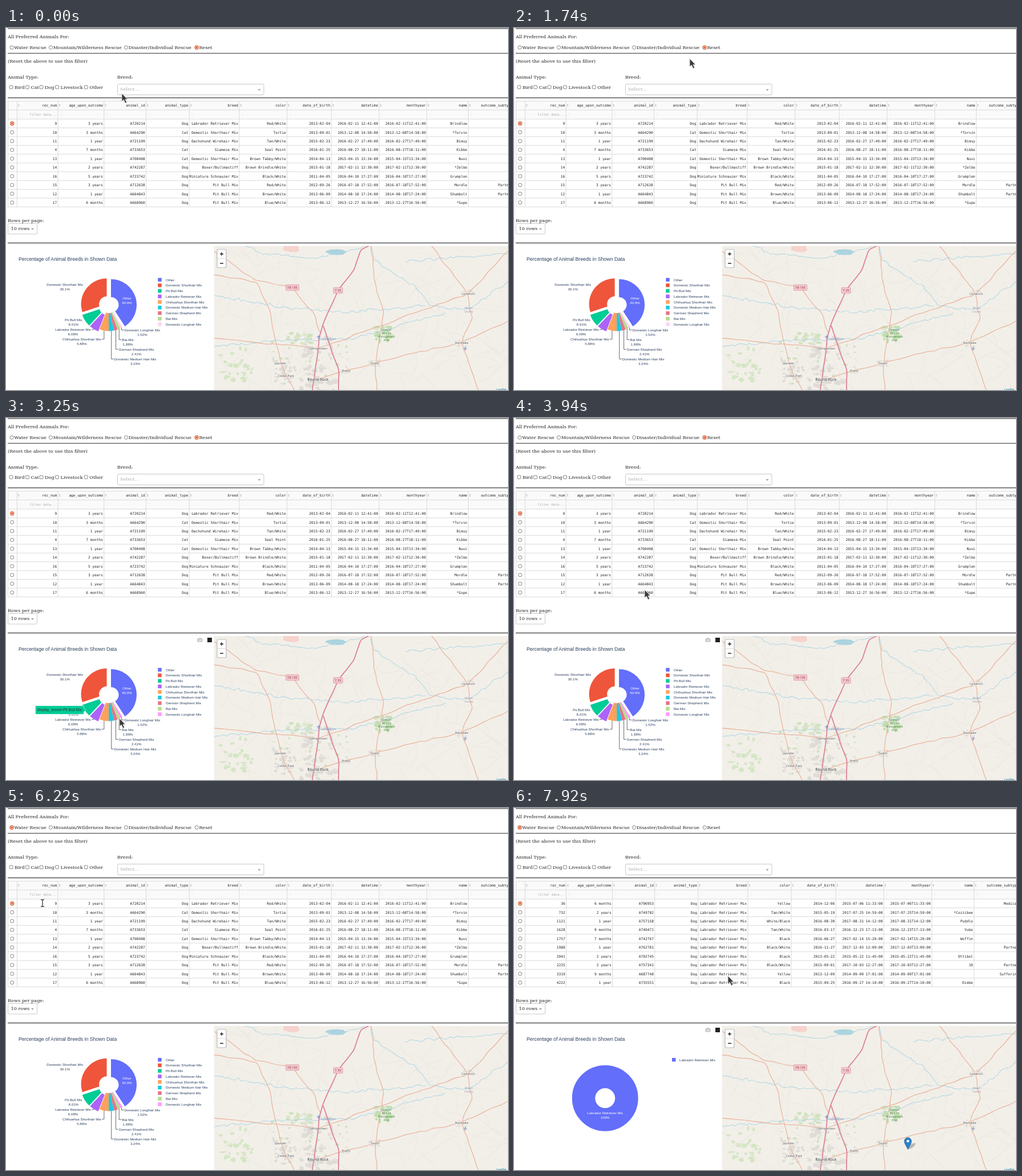
These frames come from a looping animation (880x636 px, 7.99 s). An HTML page:

```html
<!DOCTYPE html>
<html lang="en">
<head>
<meta charset="utf-8">
<title>Animal dashboard</title>
<style>
html, body { margin: 0; width: 100%; height: 100%; overflow: hidden; background: #fff; }
svg { display: block; width: 880px; height: 636px; }
text { white-space: pre; }
.serif { font: 8.12px "DejaVu Serif", "Noto Serif", serif; fill: #222; }
.mono { font: 6.2px "DejaVu Sans Mono", monospace; fill: #222; }
.chart { font: 6.18px "Liberation Sans", Arial, sans-serif; fill: #2a3f5f; }
.map { font: 5.5px "Noto Sans", sans-serif; fill: #555; text-anchor: middle; }
</style>
</head>
<body>
<svg id="stage" viewBox="0 0 880 636" xmlns="http://www.w3.org/2000/svg"></svg>
<script>
const LOOP = 7990, SELECT_AT = 5490, FILTER_AT = 6400;

let seed = 11;
const random = () => (seed = (seed * 16807) % 2147483647) / 2147483647;
const spread = size => (random() - .5) * size;
const range = n => [...Array(n).keys()];
const repeat = (n, draw) => range(n).map(draw).join("");

// Markup helpers
const text = (x, y, s, cls, extra = "") => `<text x="${x}" y="${y}" class="${cls}" ${extra}>${s}</text>`;
const rect = (x, y, w, h, fill, extra = "") =>
  `<rect x="${x}" y="${y}" width="${w}" height="${h}" fill="${fill}" ${extra}/>`;
const circle = (x, y, r, fill, extra = "") => `<circle cx="${x}" cy="${y}" r="${r}" fill="${fill}" ${extra}/>`;
const path = (d, stroke, width = 1, fill = "none") =>
  `<path d="${d}" stroke="${stroke}" stroke-width="${width}" fill="${fill}"/>`;
const group = (id, body, extra = "") => `<g id="${id}" ${extra}>${body}</g>`;
const END = 'text-anchor="end"', MIDDLE = 'text-anchor="middle"';

const pen = document.createElement("canvas").getContext("2d");
const chartWidth = (s, size) => {
  pen.font = `100px "Liberation Sans", Arial, sans-serif`;
  return pen.measureText(s).width * size / 100;
};

const radio = (x, y, on) => on
  ? circle(x, y, 3.1, "#fff", 'stroke="#d9582b" stroke-width="1.2"') + circle(x, y, 1.8, "#d9582b")
  : circle(x, y, 3.1, "#fff", 'stroke="#777" stroke-width=".9"');

// Page controls
const RESCUES = { "Water Rescue": 10, "Mountain/Wilderness Rescue": 78.5, "Disaster/Individual Rescue": 210.5, "Reset": 334.2 };
const TYPES = { Bird: 9, Cat: 37.5, Dog: 62, Livestock: 89.5, Other: 140.3 };

const rescueRadios = chosen =>
  Object.entries(RESCUES).map(([name, x]) => radio(x, 34.2, name === chosen)).join("");

function controls() {
  const rule = y => path(`M3 ${y}H880`, "#6b6b6b", 1.7);
  const caret = (x, y) => path(`M${x - 2.5} ${y - 1}h5l-2.5 2.7z`, "none", 0, "#999");
  const frame = 'rx="2" stroke="#c8c8c8"';
  return rule(1) + rule(44.5) + rule(122.7) + rule(377.6) + path("M.5 0V378", "#eee")
    + text(3, 18, "All Preferred Animals For:", "serif")
    + Object.entries(RESCUES).map(([s, x]) => text(x + 4.3, 37, s, "serif")).join("")
    + text(3, 61, "(Reset the above to use this filter)", "serif")
    + text(3, 88.5, "Animal Type:", "serif") + text(195, 88.5, "Breed:", "serif")
    + Object.entries(TYPES).map(([s, x]) =>
      rect(x - 2.9, 101, 5.8, 5.8, "#fff", 'rx="1" stroke="#777" stroke-width=".9"')
      + text(x + 6, 106.6, s, "serif")).join("")
    + rect(195.5, 98.5, 256.5, 19, "#fff", frame) + caret(444, 108.5)
    + text(200, 110.3, "Select...", "serif", 'style="fill:#aaa"')
    + text(3, 341.2, "Rows per page:", "serif")
    + rect(3.5, 343.5, 51, 18.5, "#fff", frame) + caret(46.5, 353)
    + text(8.5, 355.2, "10 rows", "serif");
}

// Data table
const HEADERS = ["rec_num", "age_upon_outcome", "animal_id", "animal_type", "breed", "color",
  "date_of_birth", "datetime", "monthyear", "name", "outcome_subtype"];

// Row: number | age | id | type | breed | color | birth | date | time | name | subtype
const ALL_ROWS = `9|3 years|A720214|Dog|Labrador Retriever Mix|Red/White|2013-02-04|2016-02-11|12:41:00|Brindlow|
10|3 months|A664290|Cat|Domestic Shorthair Mix|Tortie|2013-09-01|2013-12-08|14:58:00|*Torvin|
11|1 year|A721199|Dog|Dachshund Wirehair Mix|Tan/White|2015-02-23|2016-02-27|17:49:00|Bimsy|
4|7 months|A733653|Cat|Siamese Mix|Seal Point|2016-01-25|2016-08-27|18:11:00|Kibbo|
13|1 year|A700408|Cat|Domestic Shorthair Mix|Brown Tabby/White|2014-04-13|2015-04-15|13:34:00|Nuvi|
14|2 years|A742287|Dog|Boxer/Bullmastiff|Brown Brindle/White|2015-01-18|2017-02-11|12:30:00|*Zelbo|
16|5 years|A723742|Dog|Miniature Schnauzer Mix|Black/White|2011-04-05|2016-04-10|17:27:00|Grumplen|
15|3 years|A712638|Dog|Pit Bull Mix|Red/White|2012-09-26|2016-07-18|17:52:00|Mordle|Partner
12|1 year|A664843|Dog|Pit Bull Mix|Brown/White|2013-06-09|2014-08-18|17:24:00|Shumbolt|Partner
17|6 months|A668960|Dog|Pit Bull Mix|Blue/White|2013-06-12|2013-12-27|16:56:00|*Gupo|`;

const WATER_ROWS = `36|6 months|A706953|Yellow|2014-12-06|2015-07-06|11:33:00||Medical
732|2 years|A749782|Tan/White|2015-05-19|2017-07-25|14:59:00|*Cozzibee|
1121|1 year|A757158|White/Black|2016-08-30|2017-08-31|14:12:00|Puddlo|
1628|9 months|A740471|Tan/White|2016-03-17|2016-12-23|17:13:00|Vubo|
1757|7 months|A742767|Black|2016-06-27|2017-02-14|15:20:00|Woffin|
1988|1 year|A762781|Black/White|2016-11-27|2017-12-03|13:09:00||Partner
2041|2 years|A702745|Black|2013-05-22|2015-05-22|11:45:00|Ottibel|
2225|2 years|A757341|Black/White|2015-09-01|2017-10-03|12:27:00|19|Partner
3319|9 months|A687748|Yellow|2013-12-09|2014-09-09|17:01:00||Suffering
4222|1 year|A735551|Black|2015-09-25|2016-09-27|14:10:00|Dimbo|`;

const expand = c => [...c.slice(0, 7), `${c[7]} ${c[8]}`, `${c[7]}T${c[8]}`, c[9], c[10]];
const allRows = ALL_ROWS.split("\n").map(r => expand(r.split("|")));
const waterRows = WATER_ROWS.split("\n").map(r => {
  const c = r.split("|");
  return expand([...c.slice(0, 3), "Dog", "Labrador Retriever Mix", ...c.slice(3)]);
});

// Each column is a base width plus one pixel per character of its longest cell.
function table(rows, baseWidth) {
  const edges = [19.4];
  HEADERS.forEach((h, i) =>
    edges.push(edges[i] + baseWidth + Math.max(h.length, ...rows.map(r => r[i].length))));
  const rowY = i => 160 + 15.43 * i;
  const cells = (values, y) => values.map((s, i) => s && text(edges[i + 1] - 1.8, y, s, "mono", END)).join("");
  const lines = [128.5, 144, ...range(11).map(rowY)].map(y => `M3 ${y}H880`).join("")
    + [3.5, ...edges].map(x => `M${x} 128.5V${rowY(10)}`).join("");
  const icons = edges.map(x =>
    path(`M${x + 1.6} 135.3l1.3 -1.7l1.3 1.7zm0 1.2h2.6l-1.3 1.7z`, "none", 0, "#aaa")
    + path(`M${x + 3} 149.5h3v4h-3`, "#f0f0f0", .7)).join("");
  return rect(3, 128.5, 877, 31.5, "#fafafa") + path(lines, "#d6d6d6", .9) + icons
    + cells(HEADERS, 138.3)
    + text(edges[1] - 1.8, 153.8, "filter data...", "mono", END + ' style="font-size:5.7px;fill:#aaa"')
    + rows.map((r, i) => cells(r, rowY(i) + 10.1) + radio(10.7, rowY(i) + 7.8, i === 0)).join("");
}

// Donut charts
const PIE = { x: 180, y: 487.5, r: 45, hole: 13.5, pull: 4.2 };
const SLICES = [["Other", 40.9, "#636efa"], ["Domestic Shorthair Mix", 30.1, "#ef553b"],
  ["Pit Bull Mix", 8.01, "#00cc96"], ["Labrador Retriever Mix", 6.08, "#ab63fa"],
  ["Chihuahua Shorthair Mix", 5.88, "#ffa15a"], ["Domestic Medium Hair Mix", 3.24, "#19c9e4"],
  ["German Shepherd Mix", 2.41, "#e57389"], ["Bat Mix", 1.88, "#b6dc8c"],
  ["Domestic Longhair Mix", 1.52, "#ff97ff"]].map(([name, share, color]) => ({ name, share, color }));
const clockwise = [SLICES[0], ...SLICES.slice(1).reverse()];
const total = SLICES.reduce((sum, s) => sum + s.share, 0);

let turn = 0;
for (const s of clockwise) {
  s.from = turn;
  s.to = turn += s.share / total * 2 * Math.PI;
  s.mid = (s.from + s.to) / 2;
  s.side = Math.sin(s.mid) > 0 ? 1 : -1;
  s.pull = s.share > 6 ? PIE.pull : 0;
  s.cls = s.name === "Domestic Longhair Mix" ? 'class="longhair"' : "";
}

const slicePoint = (s, r, angle) => [
  PIE.x + s.pull * Math.sin(s.mid) + r * Math.sin(angle),
  PIE.y - s.pull * Math.cos(s.mid) - r * Math.cos(angle)];

function slicePath(s) {
  const { r, hole } = PIE, large = s.to - s.from > Math.PI ? 1 : 0;
  return `M${slicePoint(s, r, s.from)}A${r} ${r} 0 ${large} 1 ${slicePoint(s, r, s.to)}`
    + `L${slicePoint(s, hole, s.to)}A${hole} ${hole} 0 ${large} 0 ${slicePoint(s, hole, s.from)}Z`;
}

const twoLines = (x, y, name, share, color = "#2a3f5f") => [name, share + "%"].map((s, i) =>
  text(x, y + 2.2 + 8 * i, s, "chart", `${MIDDLE} style="fill:${color}"`)).join("");

// Labels follow the slices down each side and keep a minimum distance.
function outerLabels() {
  const right = clockwise.slice(1).filter(s => s.side > 0);
  const left = SLICES.slice(1).filter(s => s.side < 0);
  const nextY = { "1": 0, "-1": 0 };
  return [...right, ...left].map(s => {
    const [x, startY] = slicePoint(s, PIE.r, s.mid);
    const y = Math.max(483 - 55 * Math.cos(s.mid), nextY[s.side]);
    nextY[s.side] = y + 17;
    const leader = s.share < 7 ? path(`M${x} ${startY}V${y}h${s.side * 4}`, "#444", .8) : "";
    return leader + twoLines(x + s.side * (5 + chartWidth(s.name, 6.18) / 2), y, s.name, s.share);
  }).join("");
}

const title = text(22, 408.8, "Percentage of Animal Breeds in Shown Data", "chart", 'style="font-size:8.74px"');
const legendItem = (x, y, gap, s) =>
  rect(x, y - 3.2, 6.4, 6.4, s.color, s.cls) + text(x + gap, y + 2.2, s.name, "chart");

const allChart = () => title
  + SLICES.map(s => `<path ${s.cls} d="${slicePath(s)}" fill="${s.color}"/>`).join("")
  + outerLabels() + twoLines(212, 474.5, "Other", 40.9, "#fff")
  + SLICES.map((s, i) => legendItem(266.3, 442.3 + 9.77 * i, 13.6, s)).join("");

const waterChart = () => title
  + circle(159.7, 509.8, 37.7, "none", 'stroke="#636efa" stroke-width="40.4"')
  + twoLines(159.7, 535.5, "Labrador Retriever Mix", 100, "#fff")
  + legendItem(277, 442.3, 13, { name: "Labrador Retriever Mix", color: "#636efa" });

const modebar = path("M335.5 387.5h2l1-1.3h3l1 1.3h1.8v6h-8.8z", "none", 0, "#c4c4c4")
  + circle(340, 390.5, 1.8, "#fff") + circle(340, 390.5, 1, "#c4c4c4") + rect(353, 386, 8, 8, "#222");

// Hover label starts; each lasts until the next one
const HOVERS = [[2850, "Domestic Shorthair Mix"], [3040, "Pit Bull Mix"], [3320, "Other"],
  [3530, "Domestic Shorthair Mix"], [3740, null]];

function hoverLabel([, name], i) {
  const s = SLICES.find(slice => slice.name === name);
  if (!s) return "";
  const [x, y] = slicePoint(s, PIE.r - 2, s.mid);
  const label = "display_breed=" + name, near = x + s.side * 4;
  const far = near + s.side * (chartWidth(label, 6.7) + 6);
  const box = `M${x} ${y}L${near} ${y - 4}V${y - 7.5}H${far}V${y + 7.5}H${near}V${y + 4}Z`;
  const ink = name === "Pit Bull Mix" ? "#333" : "#fff";
  return group("hover" + i, path(box, "#fff", .6, s.color)
    + text((near + far) / 2, y + 2.2, label, "chart", `${MIDDLE} style="font-size:6.7px;fill:${ink}"`));
}

// Map: town centre and size of its built-up area
const TOWNS = { "Georgetown": [547, 563, 26], "Leander": [481, 589, 16], "Cedar Park": [491, 611, 20],
  "Round Rock": [547, 618, 32], "Hutto": [596, 602, 9], "Taylor": [647, 589, 10],
  "Rockdale": [799, 553, 9], "Cameron": [810, 467, 9] };

const MOTORWAYS = ["636,383>622,390>610,425>582,461>556,520>549,545>Georgetown>537,636",
  "556,523>572,570>583,600>583,636"];
const HIGHWAYS = ["365,392>437,444>502,456>538,500>551,535", "365,434>440,446>463,500>Leander>505,636",
  "Round Rock>Hutto>Taylor>700,574>Rockdale>880,515", "640,383>645,440>662,500>Taylor>650,636",
  "746,383>Cameron>817,510>Rockdale>828,636", "880,392>Cameron>Georgetown", "365,545>Georgetown"];
const RIVERS = ["418,383>450,396>540,404>632,383", "640,383>646,408>712,450>748,490>812,493>880,446",
  "700,410>880,396", "365,470>480,490>590,500>735,488", "365,560>490,548>600,548>770,500"];

// Follows a route of towns and "x,y" points, meandering by the given amount.
function route(stops, wobble, step) {
  const ends = stops.split(">").map(s => TOWNS[s] || s.split(",").map(Number));
  const p = ends.flatMap((a, i) => {
    const b = ends[i + 1];
    if (!b) return [a];
    const n = Math.ceil(Math.hypot(b[0] - a[0], b[1] - a[1]) / step);
    return range(n).map(k => [0, 1].map(d => a[d] + (b[d] - a[d]) * k / n + (k || i ? spread(2 * wobble) : 0)));
  });
  return smooth(p);
}

function smooth(p) {
  const f = v => v.toFixed(1);
  let d = `M${p[0].slice(0, 2).map(f)}`;
  for (let i = 1; i < p.length - 1; i++)
    d += `Q${p[i].map(f)} ${[0, 1].map(k => f((p[i][k] + p[i + 1][k]) / 2))}`;
  return d + `L${p[p.length - 1].slice(0, 2).map(f)}`;
}

function lane() {
  let x = 365 + random() * 515, y = 383 + random() * 253, angle = random() * 6.3;
  return smooth(range(5).map(() => {
    angle += spread(.9);
    return [x += 13 * Math.cos(angle), y += 13 * Math.sin(angle)];
  }));
}

function blob(x, y, w, h, fill) {
  const p = range(12).map(i => {
    const a = i / 6 * Math.PI, r = .6 + .5 * random();
    return [x + w * r * Math.cos(a), y + h * r * Math.sin(a)].map(v => v.toFixed(1));
  });
  return path(`M${p.join("L")}Z`, "none", 0, fill);
}

const scatter = (count, x, y, w, h, size, fill) => repeat(count, () =>
  blob(x + spread(w), y + spread(h), size * (.4 + random()), size * (.3 + random() * .7), fill));

function mapLabels() {
  const halo = 'stroke="#fff" stroke-width="1.2" stroke-opacity=".7" paint-order="stroke"';
  const stack = (words, x, y, color) => words.split(" ").map((s, i) =>
    text(x, y + 5.9 * i, s, "map", `style="font-size:4.7px;fill:${color}"`)).join("");
  const shield = (x, y, w, s) => rect(x - w / 2, y - 5, w, 10, "#f3c8cc", 'rx="1" stroke="#d98f99" stroke-width=".7"')
    + text(x, y + 2, s, "map", 'style="fill:#8a3f4c"');
  const plane = (x, y) => path(`M${x} ${y - 3}v6M${x - 3} ${y}h6M${x - 1.3} ${y + 2.6}h2.6`, "#7b86c4", 1);
  const towns = Object.entries(TOWNS).map(([s, [x, y, size]]) =>
    text(x, y + 2, s, "map", halo + (size > 30 ? ' style="font-size:6.7px;fill:#333"' : ""))).join("");
  return shield(502, 456, 23, "TB 195") + shield(582, 461, 16, "T 35") + towns
    + stack("Granger Wildlife Management Area", 667, 532, "#4d8a4a")
    + stack("Milam County", 811, 494, "#a09ab0") + stack("Georgetown", 565, 548, "#8f95c0")
    + plane(548, 542.5) + plane(805, 563)
    + text(877, 637, "Leaflet", "map", 'style="fill:#0078a8;text-anchor:end"');
}

function map() {
  const lanes = repeat(150, lane);
  const draw = (routes, wobble, step, color, width) =>
    routes.map(r => path(route(r, wobble, step), color, width)).join("");
  return rect(364.5, 383, 515.5, 253, "#f2efe9")
    + blob(500, 386, 19, 9, "#f6d3cd")
    + Object.values(TOWNS).map(([x, y, size]) =>
      scatter(size, x, y, size * 2, size * 1.5, 2 + size / 9, "#dfdcd7")).join("")
    + scatter(16, 512, 545, 50, 18, 5, "#cfe3bd") + scatter(26, 404, 592, 56, 60, 5, "#d5e6c5")
    + scatter(24, 535, 585, 140, 80, 3, "#cfe2bf") + scatter(16, 663, 537, 30, 28, 6, "#c3dfb0")
    + path(lanes, "#e0dad0", 1.1) + path(lanes, "#fcfbf8", .6)
    + blob(580, 394, 22, 5, "#aad3df")
    + draw(RIVERS, 3, 5, "#b3d8e3", 1.1)
    + draw(HIGHWAYS, 1.8, 14, "#ebb69e", 1.3) + draw(MOTORWAYS, .6, 14, "#dc8395", 1.8)
    + mapLabels()
    + rect(370, 389, 16, 32, "#fff", 'rx="2" stroke="#bbb" stroke-width="1.2"')
    + path("M370 405H386", "#ccc", .8) + path("M375 397h6M378 394v6M375 413.5h6", "#222", 1.3);
}

const pin = `<ellipse cx="697" cy="594" rx="8" ry="3" transform="rotate(-35 697 594)" fill="#777" opacity=".45"/>`
  + path("M690.5 600C688 594 684.3 590 684.3 585.3A6.2 6.2 0 0 1 696.7 585.3C696.7 590 693 594 690.5 600Z", "#2e6da4", .8, "#2a81cb")
  + circle(690.5, 585.3, 2.3, "#fff");

// Pointer stops: arrival time, x, y. It rests at each stop for one step.
const REST = 70;
const STOPS = [[260, 203, 115], [610, 298, 36], [1170, 9, 30], [1740, 308, 54], [1950, 225, 488],
  [2440, 215, 604], [2780, 157, 505], [3250, 199, 528], [3600, 160, 480], [3940, 229, 302],
  [4410, 55, 84], [5220, 8, 33], [6010, 8, 33], [6220, 64, 167], [6550, 141, 436],
  [6900, 157, 487], [7360, 157, 487], [7920, 375, 295]];

function pointerAt(t) {
  const i = STOPS.findLastIndex(stop => stop[0] <= t);
  const [time, ...here] = STOPS[Math.max(i, 0)], next = STOPS[i + 1];
  if (i < 0 || !next) return here;
  const k = Math.max(0, (t - time - REST) / (next[0] - time - REST));
  return here.map((v, d) => v + (next[d + 1] - v) * k);
}

const stage = document.getElementById("stage");
const $ = id => document.getElementById(id);

stage.innerHTML = rect(0, 0, 880, 636, "#fff") + controls()
  + group("resetChosen", rescueRadios("Reset")) + group("waterChosen", rescueRadios("Water Rescue"))
  + group("allTable", table(allRows, 64.7)) + group("waterTable", table(waterRows, 65.1))
  + group("allChart", allChart()) + group("waterChart", waterChart()) + group("modebar", modebar)
  + `<clipPath id="mapArea">${rect(364.5, 383, 515.5, 253, "#000")}</clipPath>`
  + group("map", map() + group("pin", pin), 'clip-path="url(#mapArea)"')
  + HOVERS.map(hoverLabel).join("")
  + group("arrow", path("M0 0V14L3.3 11L6 17L8.6 15.8L6 10.2H10Z", "#ddd", .9, "#3a3a3a"))
  + group("beam", path("M-3 -6H3M0 -6V6M-3 6H3", "#fff", 2.8) + path("M-3 -6H3M0 -6V6M-3 6H3", "#444", 1.4));

const show = (id, on) => $(id).style.display = on ? "" : "none";
const longhair = [...document.querySelectorAll(".longhair")];

function render(t) {
  const filtered = t >= FILTER_AT, chosen = t >= SELECT_AT;
  show("resetChosen", !chosen);
  show("waterChosen", chosen);
  for (const id of ["allTable", "allChart"]) show(id, !filtered);
  for (const id of ["waterTable", "waterChart", "pin"]) show(id, filtered);

  const fade = Math.min(1, Math.max(0, (4300 - t) / 200));
  $("modebar").style.opacity = t >= 6900 ? 1 : t >= 2020 ? fade : 0;
  longhair.forEach(n => n.setAttribute("fill", t < 2020 ? "#fbd3f6" : "#ff97ff"));
  HOVERS.slice(0, -1).forEach(([from], i) => show("hover" + i, t >= from && t < HOVERS[i + 1][0]));

  const [x, y] = pointerAt(t);
  const typing = t >= 6200 && t < 6320;
  show("arrow", !typing);
  show("beam", typing);
  $(typing ? "beam" : "arrow").setAttribute("transform", `translate(${x} ${y})`);
}

function tick() {
  render(performance.now() % LOOP);
  requestAnimationFrame(tick);
}
tick();
</script>
</body>
</html>
```
